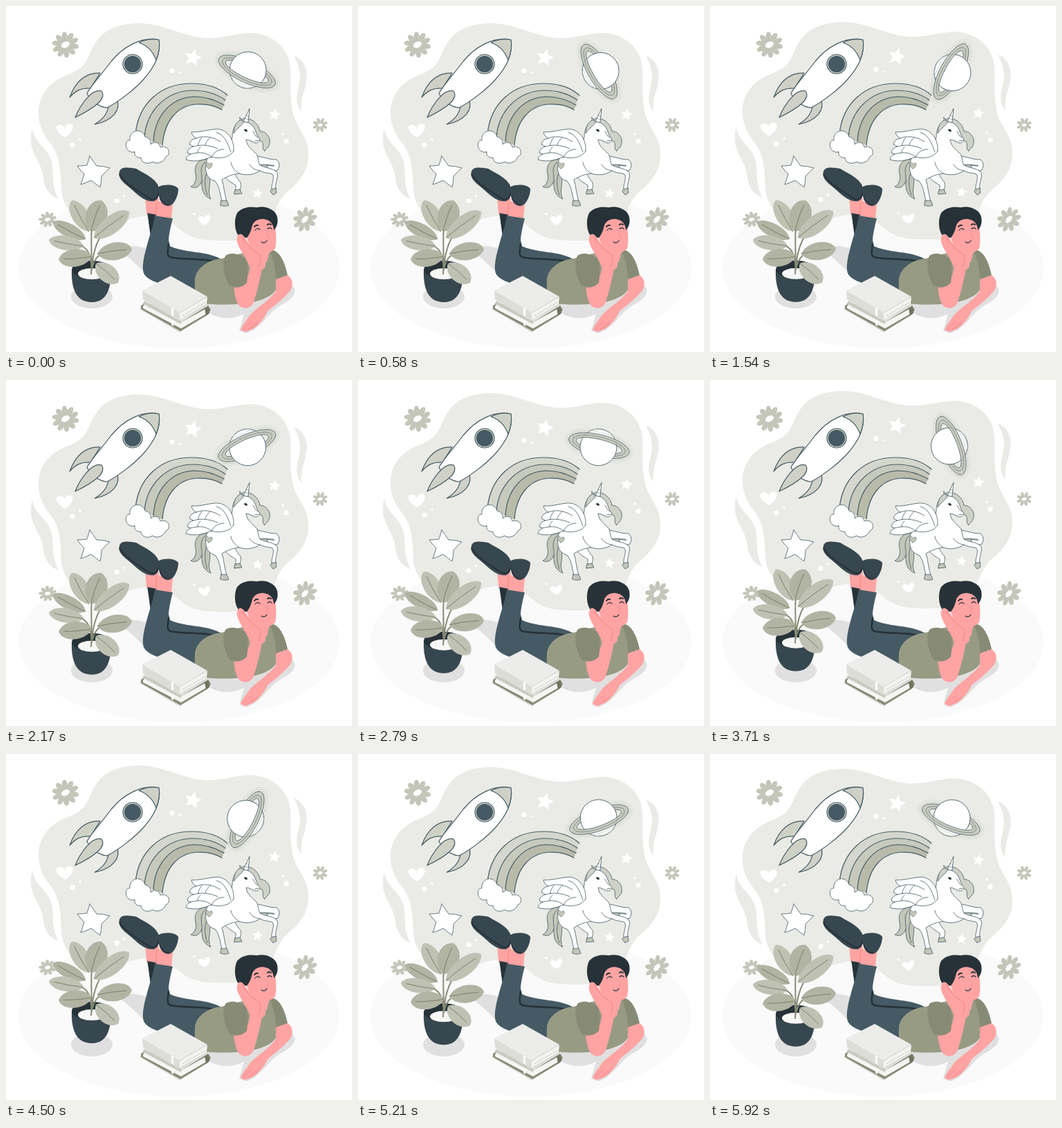
These frames come from a looping animation (500x500 px, 5960 ms). An HTML page:

```html
<!DOCTYPE html>
<html lang="en">
<head>
<meta charset="utf-8">
<title>Daydreaming</title>
<style>
html, body { margin: 0; width: 100%; height: 100%; overflow: hidden; background: #fff; }
svg { display: block; width: 100vw; height: 100vh; }
.ink { stroke: #455a64; stroke-width: 1.2; stroke-linejoin: round; stroke-linecap: round; }
.thin { stroke: #455a64; stroke-width: .8; stroke-linejoin: round; stroke-linecap: round; }
.line { fill: none; }
.mid { fill: #c3c6b8; }
.pale { fill: #cfd1c7; }
.navy { fill: #37474f; }
.jean { fill: #455a64; }
.black { fill: #263238; }
.skin { fill: #ffa3a3; }
.olive { fill: #979b84; }
.dusk { fill: #878b75; }
.crease { fill: none; stroke: #eb8587; stroke-width: .9; stroke-linecap: round; }
</style>
</head>
<body>
<svg viewBox="0 0 500 500" fill="#fff">
<defs>
  <clipPath id="back"><rect x="-60" y="-60" width="120" height="60"/></clipPath>
  <clipPath id="front"><rect x="-60" width="120" height="60"/></clipPath>
  <g id="ring">
    <path fill="#c3c6b8" fill-opacity=".85" fill-rule="evenodd" d="M-45 0A45 16 0 0 1 45 0A45 16 0 0 1 -45 0ZM-34 0A34 9 0 0 1 34 0A34 9 0 0 1 -34 0Z"/>
    <g fill="none" stroke="#455a64" stroke-width=".7">
      <ellipse rx="45" ry="16"/><ellipse rx="34" ry="9"/>
      <ellipse rx="39" ry="12.500" stroke-width=".5"/>
      <ellipse rx="48" ry="19" stroke="#b4b8aa" stroke-width=".5"/>
      <ellipse rx="51" ry="22" stroke="#d0d3c9" stroke-width=".5"/>
    </g>
  </g>
</defs>

<ellipse cx="250" cy="378.500" rx="232" ry="116.500" fill="#fafafa"/>
<g id="flowers" class="mid"></g>

<g id="dream">
  <path fill="#eaebe6" d="M129 54C140 34 164 25 192 25C226 25 250 42 285 46C312 48 334 38 357 39C383 41 408 58 411 90C412 118 409 141 418 165C425 181 437 193 437 214C437 241 422 255 407 268C387 285 392 306 368 326C352 339 333 339 314 339C290 339 270 338 253 324C240 312 226 303 205 303C180 304 162 318 136 316C102 314 83 294 80 266C79 240 79 220 66 201C54 187 47 173 47 154C47 128 64 109 88 100C121 88 116 73 129 54Z"/>
  <path fill="#eaebe6" d="M38 177C42 202 64 204 67 232C68 252 68 265 76 279C58 272 55 258 53 243C50 222 29 210 38 177ZM416 72C429 76 437 91 434 108C432 124 425 133 427 153C419 144 419 132 422 120C427 104 426 91 416 72Z"/>
  <g id="charms"></g>
</g>

<path class="thin" d="M121 217Q126 224 131 231Q141 231 150 234Q143 240 138 246Q138 255 136 262Q129 257 123 252Q115 256 108 258Q111 250 113 243Q107 237 103 231Q111 231 117 230Q119 224 121 217Z"/>

<!-- rocket -->
<g class="ink">
  <path class="pale" d="M136 97C115 96 101 108 92 132C101 122 109 118 122 119Z"/>
  <path class="pale" d="M160 134C167 150 154 166 128 171C140 164 147 156 148 144Z"/>
  <path d="M221 49C196 44 170 58 152 80C138 99 126 111 117 126C122 137 134 146 146 147C165 137 186 120 198 107C213 90 224 72 221 49Z"/>
  <path class="pale" d="M192 53C202 48 213 47 221 49C223 59 221 68 217 78C212 65 205 57 192 53Z"/>
  <path class="pale" d="M138 123C146 134 127 148 100 161C107 143 125 118 138 123Z"/>
  <circle class="pale" cx="183" cy="84" r="14"/>
  <circle class="jean" cx="183" cy="84" r="11.500"/>
</g>

<!-- rainbow -->
<path fill="#d5d7ce" d="M187 186C191 142 222 112 268 112C290 112 308 118 320 129L317 136C306 128 290 122 270 122C234 122 203 149 200 190Z"/>
<path fill="#c6c9bc" d="M200 190C203 149 234 122 270 122C290 122 306 128 317 136L315 143C303 136 290 131 272 131C239 132 215 158 213 196Z"/>
<path fill="#b8bbaa" d="M213 196C215 158 239 132 272 131C290 131 303 136 315 143L312 150C302 144 290 141 275 142C248 144 229 165 226 201Z"/>
<path class="ink line" stroke-width="1" d="M187 186C191 142 222 112 268 112C290 112 308 118 320 129M200 190C203 149 234 122 270 122C290 122 306 128 317 136M213 196C215 158 239 132 272 131C290 131 303 136 315 143M226 201C229 165 248 144 275 142C290 141 302 144 312 150"/>
<path class="thin" d="M186 211C171 214 170 193 179 194C177 179 197 175 201 189C207 190 210 195 209 200C214 195 222 197 223 204C235 200 240 214 231 218C228 227 216 229 212 225C204 230 195 226 195 219C190 220 185 217 186 211Z"/>

<g id="planet">
  <use href="#ring" clip-path="url(#back)"/>
  <circle class="thin" cx="0.300" cy="-2.500" r="26.500"/>
  <use href="#ring" clip-path="url(#front)"/>
</g>

<!-- unicorn -->
<g class="thin">
  <path class="mid" d="M291 222C278 220 271 231 274 243C276 252 272 259 267 261C274 265 281 260 283 253C282 266 286 275 296 279C290 268 297 258 294 246Z"/>
  <path class="line" d="M288 225C278 234 284 243 283 253M291 237C286 249 287 263 291 273"/>
  <path d="M314 243C319 252 326 255 332 259C333 264 330 267 331 271L338 270C337 265 341 260 339 255C333 248 331 243 329 238Z"/>
  <path class="mid" d="M331 266L338 265L341 271L330 272Z"/>
  <path d="M355 217C365 215 377 222 391 222C397 227 395 233 392 238C384 238 379 235 373 235L371 231C378 229 383 232 388 231C386 229 375 230 360 229Z"/>
  <path class="mid" d="M378 234L371 237L366 233L371 229L377 230Z"/>
  <path class="pale" d="M338 165C349 158 365 167 367 181C375 181 383 189 381 199C379 207 374 206 374 210C369 206 373 200 370 196C364 194 360 187 357 181Z"/>
  <path d="M338 166C331 170 327 180 327 188C326 199 324 204 320 207C307 204 294 211 290 223C286 240 291 250 302 253C309 261 309 271 312 282L319 282C315 270 315 259 312 251C320 246 328 243 337 242C348 246 360 243 367 238C374 242 380 241 385 243C389 249 383 257 384 265L390 264C388 257 394 247 392 241C387 234 376 235 367 230C363 223 366 217 360 212C354 206 348 202 347 193C352 193 356 197 361 198C365 198 368 194 366 191C361 187 362 178 355 172C350 168 346 166 342 167L338 161Z"/>
  <path class="mid" d="M311 281L319 281L322 288C317 290 313 289 310 288ZM384 265L390 263L391 270L386 273L382 268Z"/>
  <path d="M343 167L352 148L350 168Z"/>
  <path class="line" stroke-width=".5" d="M345 162L350 164M347 158L351 160"/>
  <path class="pale" d="M338 165C331 169 329 177 329 184C334 176 340 174 344 167Z"/>
  <path d="M329 209C330 196 323 181 308 178C296 177 282 183 268 182Q269 188 275 191Q266 193 265 200L271 203Q263 205 262 212L267 214Q260 217 260 222C276 227 288 221 297 218C309 222 326 218 329 209Z"/>
  <path class="line" d="M275 191C288 186 300 190 310 196M271 203C284 199 296 202 306 206M267 214C280 210 290 212 297 218M283 190C280 194 277 199 278 202M295 190C291 194 288 198 288 201M281 204C278 207 276 210 277 212M304 183C316 185 321 200 325 211M297 218C300 212 306 207 315 207"/>
  <path class="line" d="M337 242C330 238 326 232 325 226M367 238C359 237 355 234 352 229M357 181C360 186 361 189 364 190M360 195L365 194"/>
  <path class="black" stroke-width=".4" d="M344 179C346 177 348 178 349 181C347 182 345 181 344 179Z"/>
  <path class="mid" stroke-width=".5" d="M293 235C287 231 288 226 291 226Q293 227 294 229Q296 225 298 228C299 231 296 234 293 235Z"/>
</g>

<!-- boy -->
<path fill="#e0e0e0" d="M160 351C180 343 202 346 218 360L405 398C425 408 420 421 396 433C376 446 370 465 347 473L337 469L344 445C315 458 295 448 279 433L205 390C190 375 178 362 160 351Z"/>
<path class="skin" d="M201 274L221 278L219 302L203 300Z"/>
<path class="navy" d="M164 239C167 231 180 234 188 235C199 242 216 248 221 262C222 271 221 279 214 282C200 284 190 272 178 262C169 255 161 248 164 239Z"/>
<path class="line" stroke="#263238" stroke-width="2" d="M164 243C174 259 194 269 207 278C214 281 219 279 221 269"/>
<path class="jean" d="M204 299L220 302L232 325L237 347C262 358 290 353 313 367L285 382L232 374L212 345Z"/>
<path class="black" d="M205 300L219 302C221 324 226 340 232 350L212 350C209 335 207 320 205 300Z"/>
<path class="skin" d="M219 282L241 285L239 308L217 305Z"/>
<path class="crease" d="M218 284L216 303"/>
<path class="navy" d="M221 261C231 257 244 258 249 264C249 274 243 289 234 289C224 288 219 277 221 261Z"/>
<path class="line" stroke="#263238" stroke-width="1.500" d="M222 275C225 284 231 288 236 287"/>
<path class="jean" d="M215 303L241 307C237 322 233 340 234 362C250 369 278 364 298 372L275 414C250 404 212 405 200 388C195 378 200 360 204 345C208 330 213 318 215 303Z"/>
<path class="line" stroke="#263238" stroke-width="2.500" d="M235 343C234 354 232 360 237 363C262 368 283 363 304 370"/>
<path class="olive" d="M273 397C273 381 289 367 312 365C334 358 365 351 385 353C397 359 399 376 395 399C391 414 382 421 361 427C335 433 306 432 282 430C274 424 272 410 273 397Z"/>
<path class="dusk" d="M381 352C394 352 402 366 407 389C402 393 396 395 390 395C390 379 386 366 381 352Z"/>
<path class="skin" d="M390 395L407 389C414 394 416 402 411 411C402 422 388 433 378 441C371 457 357 469 345 471L339 468C341 460 348 455 352 447C365 434 382 424 390 412Z"/>
<path class="crease" d="M343 467L354 457M349 469L360 459M356 467L365 458"/>
<path class="skin" d="M352 352L382 350L377 370L358 376Z"/>
<path class="skin" d="M329 398L349 392L353 378L370 380C367 395 363 414 357 430C352 438 342 439 336 432C331 424 329 410 329 398Z"/>
<path class="dusk" d="M317 361C325 355 336 358 345 364C351 373 350 385 348 400C340 408 331 408 323 404C315 390 311 373 317 361Z"/>
<path class="skin" d="M347 312C352 303 376 301 387 310C391 324 391 342 389 350C382 360 366 357 355 350C349 342 344 325 347 312Z"/>
<path class="black" d="M337 333C330 326 329 309 334 299C343 289 355 290 363 291C376 288 390 295 392 305C394 315 390 321 387 324C387 316 382 309 373 308C365 307 358 311 356 317C354 325 352 330 348 335Z"/>
<path class="skin" d="M337 330C341 328 345 334 350 342C356 350 363 355 366 359C373 361 376 367 375 376C372 384 361 382 353 382C352 369 338 355 334 341C333 336 334 332 337 330Z"/>
<path class="crease" d="M341 334C348 346 358 354 366 359C370 364 367 372 365 377M375 326C379 331 381 334 378 335"/>
<path class="line" stroke="#263238" stroke-width="1.200" stroke-linecap="round" d="M360 324Q363 320 367 323M378 322Q381 319 384 322M369 341Q374 344 377 339"/>
<path class="line" stroke="#263238" stroke-width="2" stroke-linecap="round" d="M359 319Q361 316 364 317M378 316Q380 314 383 316"/>

<!-- books -->
<path fill="#e0e0e0" d="M193 438L240 415L298 440L251 472Z"/>
<path class="dusk" d="M195 433L202 429L253 457L292 433L296 439L292 446L252 470L195 438Z"/>
<path fill="#f5f5f3" d="M198 434L202 428L253 457L288 438L289 445L253 466L198 437Z"/>
<path fill="#c9cbc0" d="M200 426L253 455L253 460L197 430Z"/>
<path fill="#70755f" d="M287 437L293 434L294 444L289 447Z"/>
<path fill="#dcddd7" d="M197 411L251 442L251 455L198 424Z"/>
<path fill="#f3f3f1" d="M251 442L291 420L290 431L251 455Z"/>
<path fill="#ececea" d="M197 411L238 390L291 420L251 443Z"/>
<path class="line" stroke="#c9cbc0" stroke-width=".8" d="M251 443L291 420M251 454L291 431M254 448L289 428"/>
<path d="M239 436L242 438L242 449L239 447ZM239 455L242 457L242 463L239 461Z"/>

<!-- plant -->
<ellipse cx="124" cy="420" rx="30" ry="17" fill="#e0e0e0"/>
<g id="plant">
  <path class="navy" d="M95 381C94 408 101 428 124 428C146 428 152 408 152 381Z"/>
  <ellipse class="black" cx="123.500" cy="381" rx="28.500" ry="13"/>
  <ellipse cx="124" cy="387" rx="20" ry="8" fill="#f7f7f5"/>
  <path class="line" stroke="#878b75" stroke-width="2" d="M123 388C125 362 122 343 124 318M124 382C123 360 119 352 110 347M124 376C127 350 134 333 144 325M124 380C128 366 132 360 140 358"/>
  <g id="leaves"></g>
</g>
</svg>
<script>
const LOOP = 5960;
const $ = id => document.getElementById(id);
const each = (list, draw) => list.map(item => draw(...item)).join('');

const flower = (x, y, r, n, squash, turn) => {
  const petals = Array.from({ length: n }, (_, i) =>
    `<ellipse cx="${r * .64}" rx="${r * .36}" ry="${r * .2}" transform="rotate(${i * 360 / n})"/>`).join('');
  return `<g transform="translate(${x} ${y}) rotate(${turn}) scale(1 ${squash})">${petals}
    <circle r="${r * .5}"/><ellipse rx="${r * .32}" ry="${r * .22}" fill="#fff"/></g>`;
};

const star = (x, y, r, turn) => {
  const points = Array.from({ length: 10 }, (_, i) => {
    const a = (i * 36 + turn - 90) * Math.PI / 180, d = i % 2 ? r * .47 : r;
    return (x + d * Math.cos(a)).toFixed(1) + ',' + (y + d * Math.sin(a)).toFixed(1);
  });
  return `<polygon points="${points.join(' ')}"/>`;
};

const heart = (x, y, s, turn) =>
  `<path transform="translate(${x} ${y}) rotate(${turn}) scale(${s})" d="M0 .9C-1.500 0-1.200-.9-.6-.8Q-.1-.8 0-.3Q.1-.8 .6-.8C1.200-.9 1.500 0 0 .9Z"/>`;

const dot = (x, y, r) => `<circle cx="${x}" cy="${y}" r="${r}"/>`;

// A leaf runs along the x axis from its base to its tip.
const leaf = (x, y, tipX, tipY, w, fill) => {
  const l = Math.hypot(tipX - x, tipY - y);
  const turn = Math.atan2(tipY - y, tipX - x) * 180 / Math.PI;
  return `<g transform="translate(${x} ${y}) rotate(${turn})">
    <path fill="${fill}" d="M0 0C${l * .2} ${-w} ${l * .9} ${-w} ${l} 0C${l * .85} ${w} ${l * .15} ${w} 0 0Z"/>
    <path fill="none" stroke="#70755f" stroke-width=".8" d="M0 0Q${l * .45} ${-w * .12} ${l * .85} 0"/></g>`;
};

$('flowers').innerHTML = each([
  [86, 56, 20, 10, .94, -25], [454, 172, 11, 8, .96, -20],
  [432, 308.5, 19, 9, .86, -50], [60, 308.5, 13, 9, .86, -15]
], flower);

$('charms').innerHTML =
  each([[270, 75, 13, 14], [388, 157, 9, 8], [363.5, 271, 8, 8]], star) +
  each([[85, 180, 11, -4], [287, 309.5, 8, -12]], heart) +
  each([[240, 93.5, 3.6], [251, 96.5, 1.8], [96, 201, 3.6], [107, 193, 1.8], [160, 281.5, 3.6],
    [170.5, 275, 1.8], [400, 185, 1.8], [405, 195.5, 3.6], [272, 300.5, 1.8]], dot);

const light = '#bfc2b3', dark = '#b1b4a3';
$('leaves').innerHTML = each([
  [120, 326, 95, 281, 16, light], [123, 326, 138, 281, 21, dark],
  [115, 337, 68, 312, 13, dark], [127, 335, 178, 297, 17, light],
  [112, 347, 62, 338, 14, light], [132, 358, 182, 351, 17, dark],
  [124, 362, 76, 366, 17, dark], [130, 372, 162, 400, 17, light]
], leaf);

// Rises 10 px in 3 s after a delay, then sinks back.
const bob = (t, delay) => t < delay ? 0 : -10 * (1 - Math.abs(1 - (t - delay) / 3000));

function frame(now) {
  const t = now % LOOP;
  $('planet').setAttribute('transform', `translate(348.3 94.800) rotate(${25 + 360 * t / LOOP})`);
  $('dream').setAttribute('transform', `translate(0 ${bob(t, 1000)})`);
  $('plant').setAttribute('transform', `translate(0 ${bob(t, 1500)})`);
  requestAnimationFrame(frame);
}
frame(0);
</script>
</body>
</html>
```
